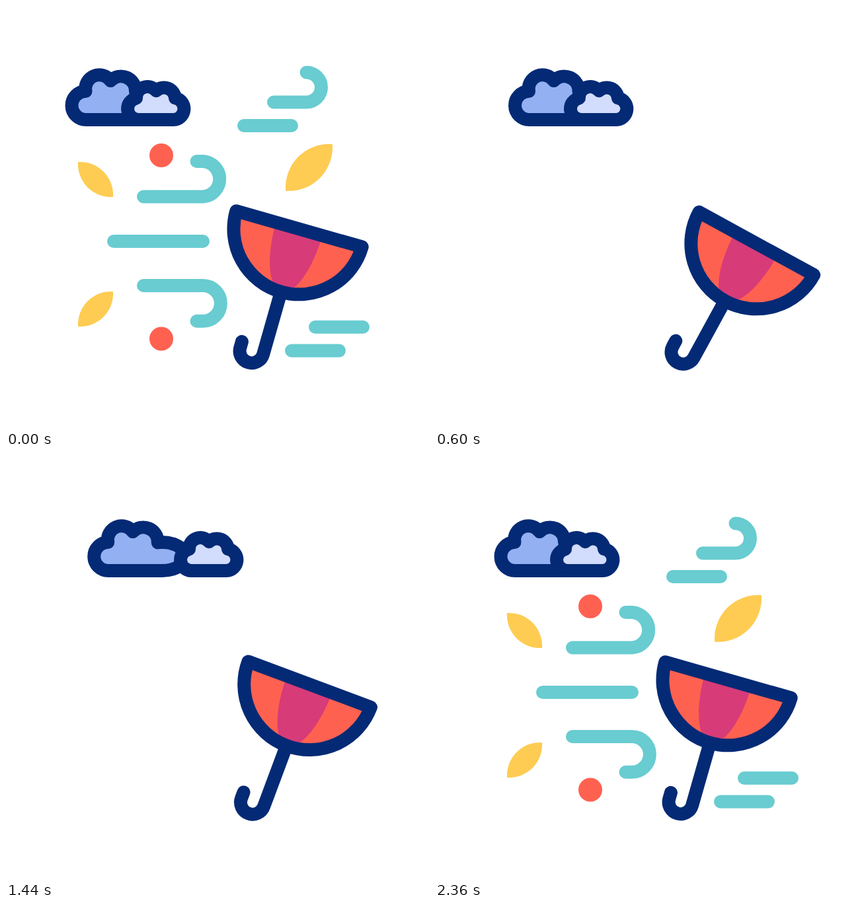
An HTML page that plays this animation: 640x640 px, repeating every 2400 ms.

```html
<!DOCTYPE html>
<html lang="en">
<head>
<meta charset="utf-8">
<title>Windy day</title>
<style>
  html, body { margin: 0; width: 100%; height: 100%; overflow: hidden; background: #fff; }
  svg { display: block; width: 100%; height: 100%; }
  .ink { stroke: #042a75; stroke-width: 20; stroke-linejoin: round; stroke-linecap: round; }
  .wind { fill: none; stroke: #68ccd1; stroke-width: 20; stroke-linecap: round; }
  .leaf { fill: #fecc52; }
  .dot { fill: #ff6150; }
</style>
</head>
<body>
<svg viewBox="0 0 640 640">
  <g id="drifters"></g>
  <path id="bigCloud" class="ink" fill="#93b0f2"
    d="M121.5 172A21.5 21.5 0 0 1 120.5 129A21 21 0 0 1 158.3 113.1A22 22 0 0 1 196 129.4A35 21.5 0 1 1 203 172Z"/>
  <path id="smallCloud" class="ink" fill="#d2dcfd"
    d="M200.5 172A16.5 16.5 0 0 1 197 139.4A17 17 0 0 1 227.2 128.3A17 17 0 0 1 256 139.3A16.5 16.5 0 0 1 253.5 172Z"/>
  <g id="winds"></g>
  <g id="umbrella">
    <path fill="#ff6150" d="M-80.5 -216H117.5A99 99 0 0 1 -80.5 -216Z"/>
    <path fill="#d73b78" d="M-18 -216H55A36.5 99 0 0 1 -18 -216Z"/>
    <path class="ink" fill="none" d="M-80.5 -216H117.5A99 99 0 0 1 -80.5 -216Z"/>
    <path class="ink" fill="none" d="M18.2 -117V-18.7A18.1 18.1 0 0 1 -18 -18.7V-28.3"/>
  </g>
</svg>
<script>
  const LOOP = 2400, STEP = 40, TURN = 1200;
  const $ = id => document.getElementById(id);

  function add(parent, tag, attrs) {
    const el = document.createElementNS('http://www.w3.org/2000/svg', tag);
    for (const name in attrs) el.setAttribute(name, attrs[name]);
    return parent.appendChild(el);
  }

  function ease(t, start, length) {
    const u = Math.min(1, Math.max(0, (t - start) / length));
    return u * u * (3 - 2 * u);
  }

  // Eased value along [time, value] stops
  function along(t, stops) {
    let value = stops[0][1];
    for (let i = 1; i < stops.length; i++) {
      const [t0, v0] = stops[i - 1], [t1, v1] = stops[i];
      value += (v1 - v0) * ease(t, t0, t1 - t0);
    }
    return value;
  }

  // Each gust: path and its place in the stagger
  const winds = [
    ['M405 145.5H454.5A22.5 22.5 0 0 0 454.5 100.5', 0],
    ['M360 181H432', 1],
    ['M208 288.5H298A26.8 26.8 0 0 0 298 235H288.5', 0],
    ['M163 356H298', 2],
    ['M208 423H298A26.8 26.8 0 0 1 298 476.8H288.5', 1],
    ['M468 485.7H540', 2],
    ['M432 521.5H504', 3]
  ].map(([d, order]) => ({
    order, el: add($('winds'), 'path', { d, class: 'wind', pathLength: 1 })
  }));

  const lens = (half, r) => ({
    class: 'leaf', d: `M${-half} 0A${r} ${r} 0 0 1 ${half} 0A${r} ${r} 0 0 1 ${-half} 0Z`
  });
  const smallLeaf = lens(37.5, 50), bigLeaf = lens(50, 66), dot = { class: 'dot', r: 18 };

  // out / in: move start, move length, distance, turn, fade start
  const drifters = [
    { tag: 'circle', look: dot, x: 235, y: 226, angle: 0,
      out: [0, 600, 130, 0, 0], in: [1522, 600, 130, 0, 1587] },
    { tag: 'circle', look: dot, x: 235, y: 503.5, angle: 0,
      out: [57, 600, 130, 0, 40], in: [1604, 582, 130, 0, 1615] },
    { tag: 'path', look: smallLeaf, x: 135.5, y: 262.5, angle: 45,
      out: [0, 600, 148, 122, 0], in: [1524, 600, 115, 104, 1587] },
    { tag: 'path', look: smallLeaf, x: 135.5, y: 458.5, angle: -45,
      out: [40, 600, 155, 139, 40], in: [1570, 630, 106.5, 101.5, 1620] },
    { tag: 'path', look: bigLeaf, x: 458.5, y: 244.3, angle: -45,
      out: [80, 600, 160, 121, 70], in: [1640, 600, 111, 97, 1655] }
  ];
  for (const d of drifters) d.el = add($('drifters'), d.tag, d.look);

  const bigPath = [[110, 0], [1090, 43], [1200, 43], [2000, 0]];
  const smallPath = [[268, 0], [1260, 80], [1483, 80], [2076, 0]];
  const swing = [[100, 0], [560, 13.4], [960, -9.3], [1360, 5.3], [1760, -2.2], [1960, 0]];

  function drawWind({ el, order }, t, leaving) {
    const from = leaving ? ease(t, order * 40, 400) : 0;
    const to = leaving ? 1 : ease(t, 1627 + order * 57, 563);
    const shift = leaving ? 64 * ease(t, 0, 520) : 64 * (ease(t, 1600, 492) - 1);
    const size = to - from;
    el.style.display = size > 0.0005 ? '' : 'none';
    el.setAttribute('stroke-dasharray', size > 0.9999 ? 'none' : `${size} 2`);
    el.setAttribute('stroke-dashoffset', -from);
    el.setAttribute('transform', `translate(${shift})`);
  }

  function drawDrifter(d, t, leaving) {
    const [start, length, distance, turn, fade] = leaving ? d.out : d.in;
    const moved = ease(t, start, length);
    const away = leaving ? moved : 1 - moved;
    const x = d.x + (leaving ? 1 : -1) * distance * away;
    d.el.setAttribute('transform', `translate(${x} ${d.y}) rotate(${d.angle + turn * away})`);
    d.el.setAttribute('opacity', leaving ? 1 - ease(t, fade, 400) : ease(t, fade, 380));
  }

  function draw(t) {
    const leaving = t < TURN;
    for (const w of winds) drawWind(w, t, leaving);
    for (const d of drifters) drawDrifter(d, t, leaving);
    $('bigCloud').setAttribute('transform', `translate(${along(t, bigPath)})`);
    $('smallCloud').setAttribute('transform', `translate(${along(t, smallPath)})`);
    $('umbrella').setAttribute('transform', `translate(366.5 540) rotate(${15.9 + along(t, swing)})`);
  }

  const begin = performance.now();
  function tick() {
    const t = (performance.now() - begin) % LOOP;
    draw(Math.floor(t / STEP) * STEP);
    requestAnimationFrame(tick);
  }
  tick();
</script>
</body>
</html>
```
